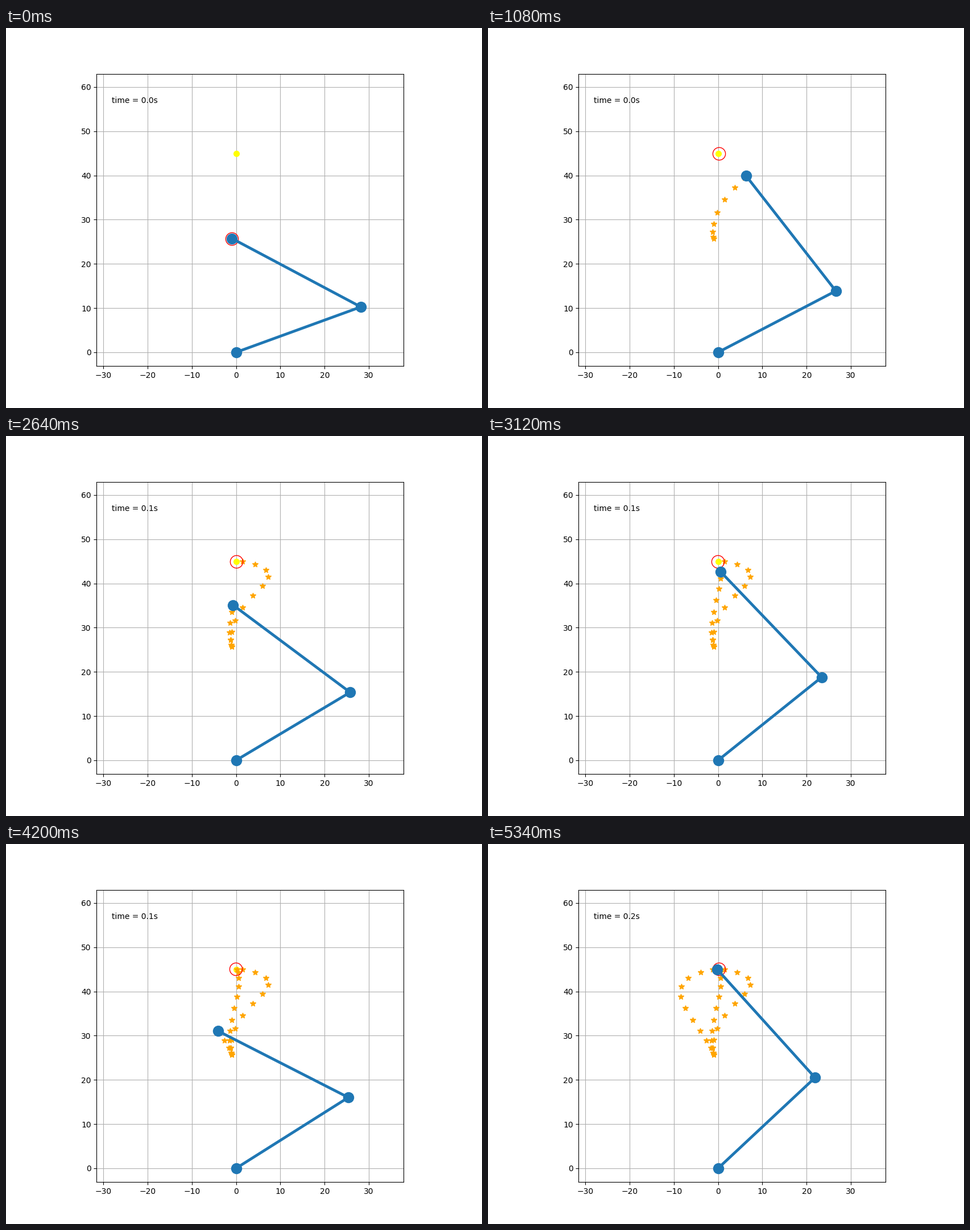
Write a matplotlib script that moves like this. It is 837 px wide and 669 px high and loops after 5370 ms.

```python
import matplotlib.pyplot as plt
import numpy as np
from matplotlib.animation import FuncAnimation

L1, L2 = 30, 33          # link lengths
REACH = L1 + L2
START = np.array([-0.95, 25.75])
GOAL = np.array([0, 45])
RUN, STEP = 60, 5        # frames per reach, frames between trail marks
ARRIVE = 57              # frame of a reach at which the hand is up
FRAMES, INTERVAL = 179, 30

# Sideways push, its lateness and the lead in height, for each reach
PUSHES = [(6.7, 1.8, 0.035), (0, 1, 0), (-8.95, 1.55, 0)]


def hand(i):
    """Cosine ease from start to goal, with a sway and a sideways push."""
    run, k = divmod(i, RUN)
    push, late, lead = PUSHES[run]
    t, u = k / RUN, min(k / ARRIVE, 1)
    u += lead * np.sin(np.pi * u) ** 4
    rise = (1 - np.cos(np.pi * u)) / 2
    sway = -0.95 * np.sin(2 * np.pi * t) * np.sin(np.pi * t)
    side = push * np.sin(np.pi * t ** late) ** 2
    return START + (GOAL - START) * rise + (sway + side, 0)


def elbow(tip):
    r = np.hypot(*tip)
    bend = np.arccos((r * r + L1 ** 2 - L2 ** 2) / (2 * r * L1))
    a = np.arctan2(tip[1], tip[0]) - bend
    return L1 * np.array([np.cos(a), np.sin(a)])


def aim(i):
    """The ring starts on the hand, then wavers slowly around the goal."""
    if i % RUN == 0:
        return START
    return GOAL + (0.18 * np.cos(2 * np.pi * (i - 53) / 135),
                   -0.13 * np.cos(2 * np.pi * (i - 63) / 220))


fig = plt.figure(figsize=(8.37001, 6.69001), dpi=100)
fig.subplots_adjust(right=0.9004, top=0.8795)
ax = fig.add_subplot(aspect="equal", xlim=(-0.5 * REACH, 0.6 * REACH),
                     ylim=(-0.05 * REACH, REACH))
ax.grid()
ax.plot(*GOAL, "o", color="yellow", ms=7)
trail, = ax.plot([], [], "*", color="orange", ms=7)
ring, = ax.plot([], [], "o", mec="red", mfc="none", ms=16)
arm, = ax.plot([], [], "o-", color="tab:blue", lw=3.5, ms=13)
label = ax.text(0.05, 0.9, "", transform=ax.transAxes)

marks = np.array([hand(i) for i in range(0, FRAMES, STEP)])


def update(i):
    tip = hand(i)
    arm.set_data(*np.array([(0, 0), elbow(tip), tip]).T)
    trail.set_data(*marks[:i // STEP + 1].T)
    ring.set_data(*np.reshape(aim(i), (2, 1)))
    label.set_text(f"time = {i * 0.001:.1f}s")
    return trail, ring, arm, label


anim = FuncAnimation(fig, update, frames=FRAMES, interval=INTERVAL,
                     repeat=True, repeat_delay=0)
plt.show()
```
